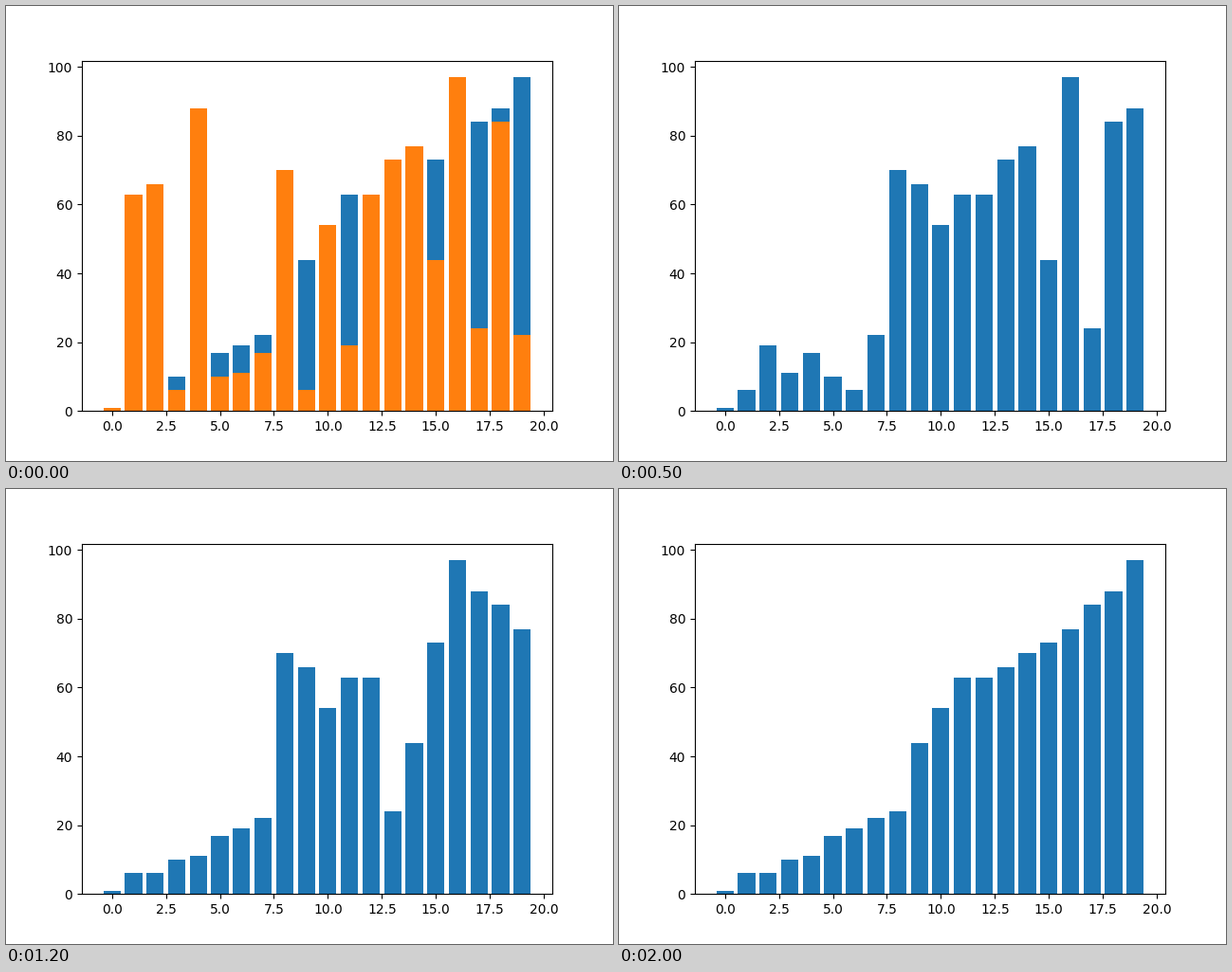
A matplotlib script for the animation above (2100 ms loop, 640x480 px).

```python
import matplotlib.pyplot as plt
from matplotlib.animation import FuncAnimation

VALUES = [1, 63, 66, 6, 88, 10, 11, 17, 70, 22,
          54, 19, 63, 73, 77, 44, 97, 24, 84, 6]


def quicksort_states(values):
    """Run quicksort and return every distinct state of the list."""
    a = list(values)
    states = []

    def swap(i, j):
        a[i], a[j] = a[j], a[i]

    def record():
        if not states or states[-1] != a:
            states.append(a[:])

    def sort(lo, hi):
        if lo >= hi:
            return
        # Park the middle element at the end as the pivot.
        swap((lo + hi) // 2, hi)
        if not states:
            record()
        pivot = a[hi]
        i, j = lo, hi - 1
        while True:
            while a[i] < pivot:
                i += 1
            while j > i and a[j] > pivot:
                j -= 1
            if i >= j:
                break
            swap(i, j)
            record()
            i, j = i + 1, j - 1
        swap(i, hi)
        record()
        sort(lo, i - 1)
        sort(i + 1, hi)

    sort(0, len(a) - 1)
    return states


def set_heights(bars, heights):
    for bar, height in zip(bars, heights):
        bar.set_height(height)


states = quicksort_states(VALUES)
positions = range(len(VALUES))

fig, ax = plt.subplots(figsize=(6.4, 4.8), dpi=100)
blue = ax.bar(positions, states[-1], color="C0")
orange = ax.bar(positions, states[0], color="C1")


def update(step):
    # The first step overlays the unsorted list on the sorted one.
    first = step == 0
    set_heights(blue, states[-1] if first else states[step])
    for bar in orange:
        bar.set_visible(first)
    return [*blue, *orange]


anim = FuncAnimation(fig, update, frames=len(states), interval=100,
                     repeat=True, repeat_delay=0, blit=False)
plt.show()
```
